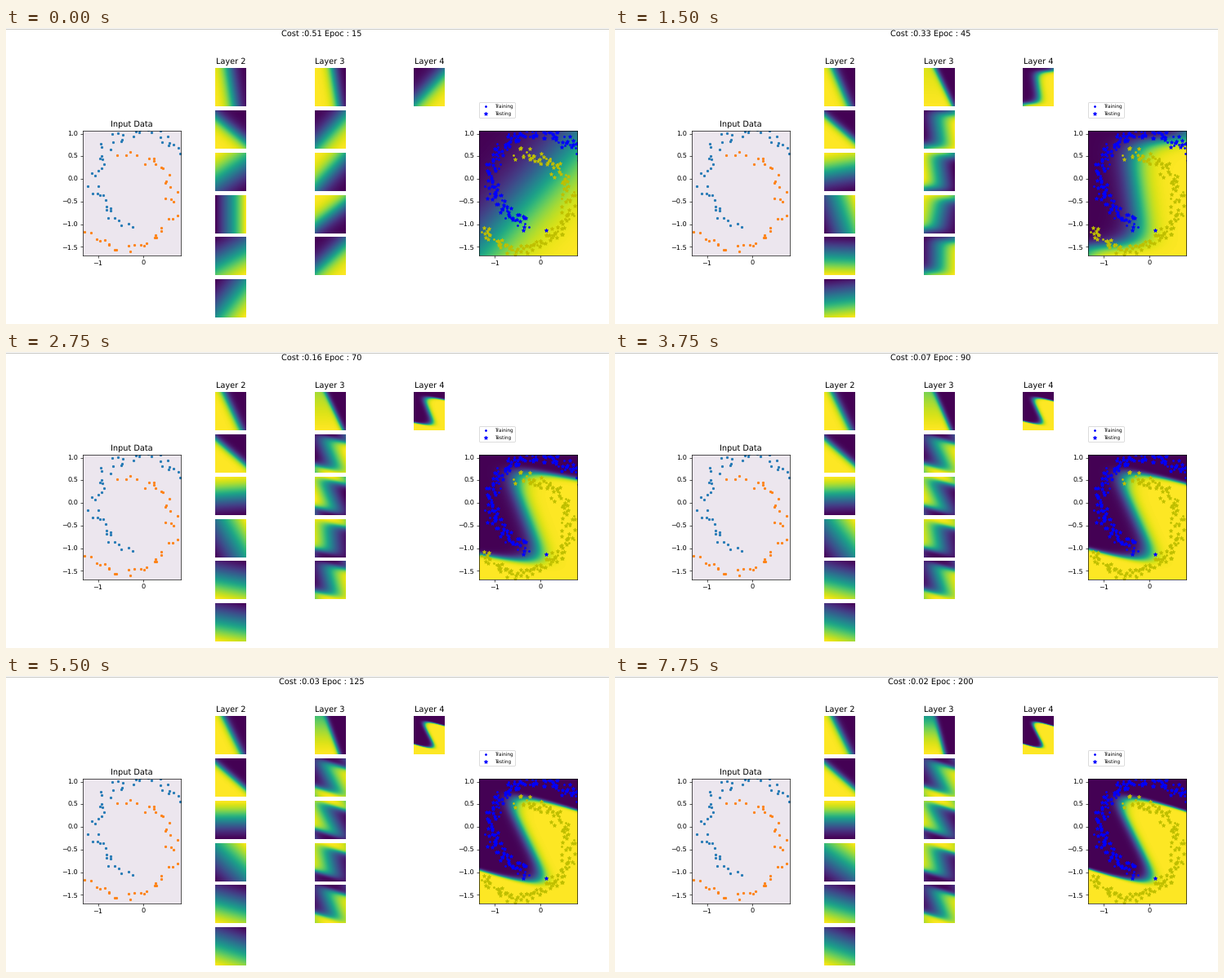
Animation of 738 by 363 pixels, one loop 8 s. Source, as a matplotlib script:

```python
import numpy as np
import matplotlib.pyplot as plt
from matplotlib.animation import FuncAnimation
from matplotlib.lines import Line2D

W, H, DPI = 738, 363, 60
STEPS, STEP_MS = 32, 250
XLIM, YLIM = (-1.332, 0.82), (-1.69, 1.072)

plt.rcParams.update({
    "font.family": "DejaVu Sans",
    "text.hinting": "none",
    "axes.titlesize": 11.7,
    "font.size": 9.8,
})

# Two crescents: centre and angle range in degrees
OUTER = (-.05, 0, 36, 256)
INNER = (-.4, -.5, -143, 95)

# Layer 2 units: (bias, u, v) before and after training
LAYER2 = [
    ((.2, -3.5, -.7), (.9, -7, -4.3)),
    ((.1, -2.7, -4), (.9, -6, -8.6)),
    ((0, -.9, 1.6), (0, 0, 2.4)),
    ((-.3, 1.1, 0), (0, .6, 1.4)),
    ((0, .7, -1.5), (0, -.4, -1.7)),
    ((0, 1.2, -1.2), (0, -.4, -1.4)),
]

# Layer 3 units after the first: (sign of the swirl, vertical lean)
LAYER3 = [(1, 0), (-1, 0), (-1, .9), (1, -.4)]

COST_EPOCHS = [15, 35, 55, 90, 110, 145, 200]
COST = [.51, .42, .23, .07, .04, .01, .02]

X, Y = np.meshgrid(np.linspace(*XLIM, 96), np.linspace(*YLIM, 120))
U, V = np.meshgrid(np.linspace(-1, 1, 96), np.linspace(-1, 1, 120))


def sigmoid(z):
    return 1 / (1 + np.exp(-z))


def mix(a, b, t):
    return a + (b - a) * t


def rescale(z):
    return (z - z.min()) / np.ptp(z)


def progress(epoch, scale):
    return 1 - np.exp(-(epoch - 15) / scale)


def swirl(fast, cap):
    """A diagonal ramp that bends into an S as training goes on."""
    x = X + .3
    w = Y - mix(-.4, -.28, fast) + .48 * fast * x
    bend = cap * np.tanh(.97 * fast ** 4 * w ** 5 / (cap + 1e-6))
    return x + mix(-.9, .65, fast) * w - bend


def output(fast, slow):
    return sigmoid((2.2 + 14 * slow) * swirl(fast, 4 * fast ** 2.5))


def layer2(fast, slow):
    for i, (start, end) in enumerate(LAYER2):
        t = slow if i == 3 else fast
        b, wu, wv = mix(np.array(start), np.array(end), t)
        yield sigmoid(b + wu * U + wv * V)


def layer3(fast, slow):
    tilt = .2 + .8 * fast * (1 - slow)
    centre = mix(.35, -.05, slow ** 2)
    edge = mix(5, 12, fast) * (centre - U - tilt * V)
    yield sigmoid(edge) * sigmoid(1.6 - 2 * slow ** 2 * V)
    s = swirl(fast, 3 * fast ** 2)
    for sign, lean in LAYER3:
        yield sigmoid(1.8 * sign * s + lean * V)


def epoch_at(i):
    if i == 3:  # one step is held
        i = 2
    return 15 + 5 * i if i <= 26 else 150 + 10 * (i - 26)


def crescent(rng, cx, cy, start, stop, count):
    t = np.radians(np.linspace(start, stop, count) + rng.normal(0, 4, count))
    r = 1.03 + np.clip(rng.normal(0, .08, count), -.15, .15)
    return cx + r * np.cos(t), cy + r * np.sin(t)


fig = plt.figure(figsize=(W / DPI, H / DPI), dpi=DPI, facecolor="white")


def axes_px(x, y, w, h):
    return fig.add_axes([x / W, 1 - (y + h) / H, w / W, h / H])


def plot_axes(x):
    ax = axes_px(x, 125.5, 120.2, 153.5)
    ax.set(xlim=XLIM, ylim=YLIM, xticks=[-1, 0], yticks=np.arange(-1.5, 1.1, .5))
    return ax


def field(ax, extent):
    return ax.imshow(np.zeros_like(X), cmap="viridis", vmin=0, vmax=1,
                     origin="lower", extent=extent, aspect="auto",
                     interpolation="bilinear")


def panels(title, x, rows):
    images = []
    for r in range(rows):
        ax = axes_px(x, 49.2 + 51.8 * r, 37.8, 47)
        images.append(field(ax, (-1, 1, -1, 1)))
        ax.axis("off")
        if r == 0:
            ax.set_title(title)
    return images


fig.add_artist(Line2D([0, 1], [1 - .5 / H] * 2, color="#c6c6c2", lw=1.2))
heading = fig.text(386.7 / W, 1 - 9.7 / H, "", size=11.7, ha="center", va="baseline")

rng = np.random.default_rng(4)
train_outer = crescent(rng, *OUTER, 50)
train_inner = crescent(rng, *INNER, 42)
test_outer = crescent(rng, *OUTER, 105)
test_inner = crescent(rng, *INNER, 105)

left = plot_axes(94)
left.set_facecolor("#ece6ee")
left.set_title("Input Data")
left.scatter(*train_outer, s=8, c="tab:blue")
left.scatter(*train_inner, s=8, c="tab:orange")

hidden = panels("Layer 2", 256.2, 6) + panels("Layer 3", 377.8, 5)
final, = panels("Layer 4", 499.2, 1)

right = plot_axes(579.2)
surface = field(right, XLIM + YLIM)
right.scatter(*train_outer, s=5, c="b", label="Training")
right.scatter(*train_inner, s=5, c="y")
right.scatter(*test_outer, s=30, c="b", marker="*", label="Testing")
right.scatter(*test_inner, s=30, c="y", marker="*")
right.scatter(.14, -1.13, s=30, c="b", marker="*")
right.legend(loc=(0, 1.1), fontsize=6.9)


def update(i):
    epoch = epoch_at(i)
    state = progress(epoch, 27), progress(epoch, 90)
    heading.set_text(f"Cost :{np.interp(epoch, COST_EPOCHS, COST):.2f} Epoc : {epoch}")
    for image, z in zip(hidden, [*layer2(*state), *layer3(*state)]):
        image.set_data(rescale(z))
    z = rescale(output(*state))
    final.set_data(z)
    surface.set_data(z)
    return [heading, surface, final, *hidden]


anim = FuncAnimation(fig, update, frames=STEPS, interval=STEP_MS,
                     init_func=lambda: update(0), repeat=True, repeat_delay=0)
plt.show()
```
